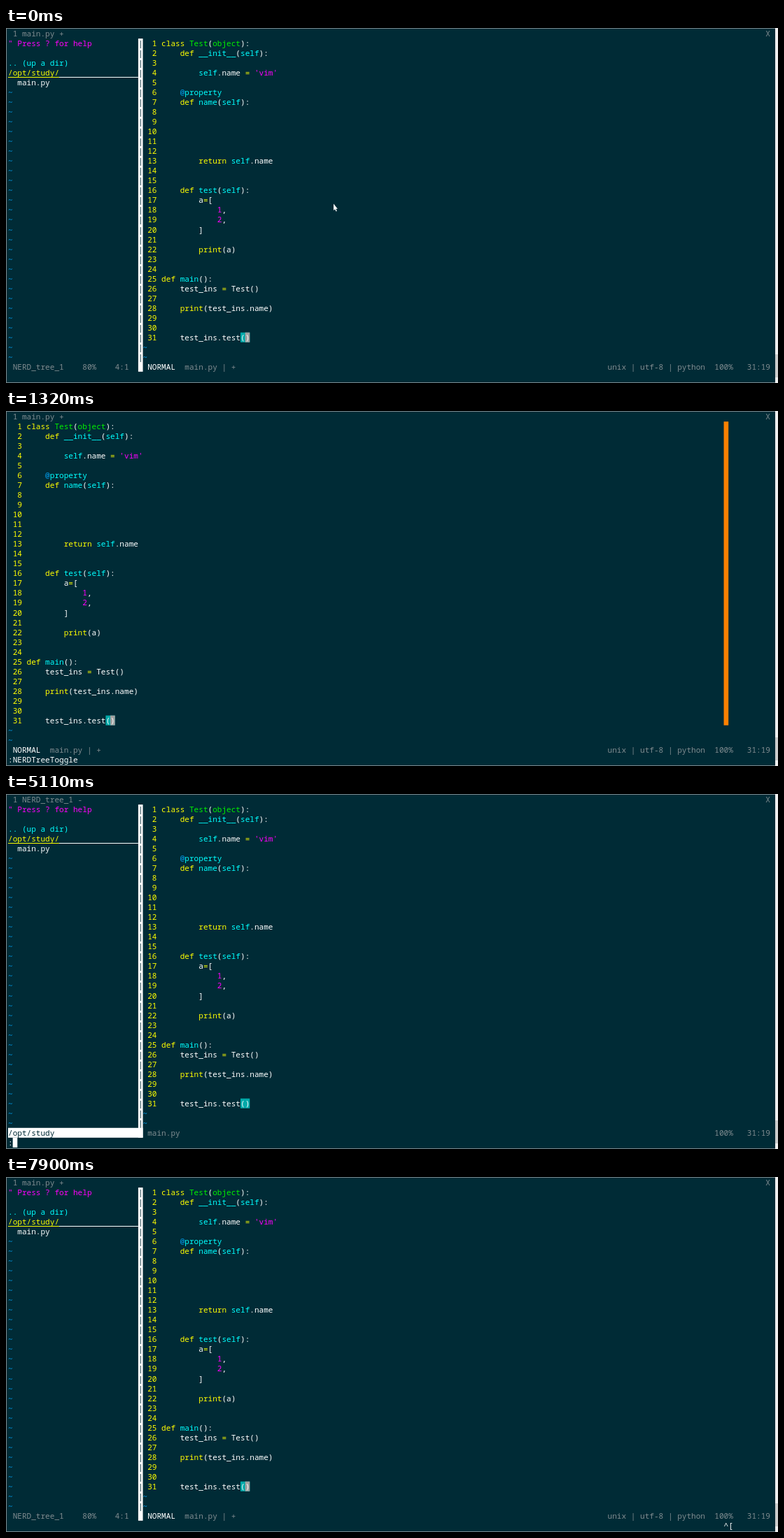
Write an HTML page with a canvas that moves like this. It is 1103 px wide and 508 px high and loops after 8 s.

```html
<!DOCTYPE html>
<html>
<head>
<meta charset="utf-8">
<style>
  html, body { margin: 0; width: 100%; height: 100%; overflow: hidden; background: #002b36; }
  canvas { display: block; }
</style>
</head>
<body>
<canvas id="screen" width="1103" height="508"></canvas>
<script>
const ctx = document.getElementById('screen').getContext('2d');
const CELL = 6.64, ROW = 14.02, LEFT = 3, TOP = 1.1, BASELINE = 11, LOOP = 8000;
const BG = '#002b36', WHITE = '#ffffff', GREY = '#808c90', YELLOW = '#ffff00',
      CYAN = '#00ffff', MAGENTA = '#ff00ff', GREEN = '#00f000', BLUE = '#00a0f0',
      TEAL = '#00a8a8', ORANGE = '#ff8000';
const TREE_COLS = 29;

const code = `class Test(object):
    def __init__(self):

        self.name = 'vim'

    @property
    def name(self):





        return self.name


    def test(self):
        a=[
            1,
            2,
        ]

        print(a)


def main():
    test_ins = Test()

    print(test_ins.name)


    test_ins.test()`.split('\n');

const syntax = [
  [/'[^']*'|\b\d+\b/g, MAGENTA],
  [/\b(class|def|return|print)\b|=/g, YELLOW],
  [/(?<=def )\w+|\bself\b|(?<=@)\w+/g, CYAN],
  [/(?<=class )\w+|\bobject\b/g, GREEN],
  [/@/g, BLUE],
];

// Each state holds from its start time until the next one.
const CMD = ':NERDTreeToggle';
const states = [
  { at: 0, tree: true, focus: 'code', cursor: true, pointer: true },
  { at: 270, focus: 'code', cursor: true, cmd: CMD },
  { at: 390, focus: 'code', cmd: CMD },
  { at: 790, tree: true, focus: 'tree', cursor: true, cmd: CMD },
  { at: 1320, focus: 'code', cursor: true, cmd: CMD },
  { at: 1470, focus: 'code', cmd: CMD },
  { at: 1750, tree: true, focus: 'tree', cursor: true, cmd: CMD },
  { at: 2510, tree: true, focus: 'tree', cmd: CMD },
  { at: 3030, tree: true, focus: 'tree', cursor: true, cmd: CMD },
  { at: 3590, tree: true, focus: 'tree', cmd: CMD },
  { at: 4140, tree: true, focus: 'tree', cursor: true, cmd: CMD },
  { at: 4390, tree: true, focus: 'tree', cmdCursor: true, cmd: ':' },
  { at: 4670, tree: true, focus: 'tree', cmd: ':' },
  { at: 5110, tree: true, focus: 'tree', cmdCursor: true, cmd: ':' },
  { at: 5690, tree: true, focus: 'tree', cmd: ':' },
  { at: 6120, tree: true, focus: 'tree', cursor: true },
  { at: 6370, tree: true, focus: 'tree', cursor: true, keys: '^[' },
  { at: 6800, tree: true, focus: 'tree', keys: '^[' },
  { at: 6950, tree: true, focus: 'tree', cursor: true, keys: '^W' },
  { at: 7100, tree: true, focus: 'code', cursor: true },
  { at: 7760, tree: true, focus: 'code', keys: '^[' },
  { at: 7900, tree: true, focus: 'code', cursor: true, keys: '^[' },
];

const xOf = col => LEFT + col * CELL;
const yOf = row => TOP + row * ROW;

function box(col, row, cols, rows, color) {
  ctx.fillStyle = color;
  ctx.fillRect(xOf(col), yOf(row), cols * CELL, rows * ROW);
}

function text(str, col, row, color) {
  ctx.fillStyle = color;
  [...str].forEach((ch, i) => {
    if (ch !== ' ') ctx.fillText(ch, xOf(col + i), yOf(row) + BASELINE);
  });
}

function highlighted(line, col, row) {
  const colors = Array(line.length).fill(WHITE);
  for (const [pattern, color] of syntax)
    for (const m of line.matchAll(pattern)) colors.fill(color, m.index, m.index + m[0].length);
  [...line].forEach((ch, i) => text(ch, col + i, row, colors[i]));
}

function drawFrame() {
  ctx.fillStyle = BG;
  ctx.fillRect(0, 0, 1103, 508);
  ctx.fillStyle = '#7d8a8e';
  ctx.fillRect(0, 0, 1099, 1);
  ctx.fillRect(0, 0, 1, 508);
  ctx.fillRect(0, 507, 1099, 1);
  ctx.fillStyle = '#f0f0f0';
  ctx.fillRect(1099, 0, 4, 508);
  ctx.fillStyle = '#cdcdcd';
  ctx.fillRect(1099, 467, 4, 33);
}

function drawTree({ focus, cursor }) {
  const focused = focus === 'tree';
  text('" Press ? for help', 0, 1, MAGENTA);
  text('.. (up a dir)', 0, 3, CYAN);
  text('/opt/study/', 0, 4, YELLOW);
  ctx.fillStyle = YELLOW;
  ctx.fillRect(LEFT, 70, 11 * CELL, 1);
  ctx.fillStyle = WHITE;
  ctx.fillRect(xOf(11), 70, 17 * CELL, 1);
  text('main.py', 2, 5, WHITE);
  for (let row = 6; row < 34; row++) text('~', 0, row, BLUE);

  box(28, 1, 1, 34, WHITE);
  for (let row = 1; row < 34; row++) text('|', 28, row, BG);
  if (focused) {
    box(0, 34, TREE_COLS, 1, WHITE);
    text('/opt/study', 0, 34, BG);
  } else {
    text('NERD_tree_1    80%    4:1', 1, 34, GREY);
  }
  if (focused && cursor) {
    box(0, 4, 1, 1, WHITE);
    text('/', 0, 4, BG);
  }
}

function drawCode({ tree, focus, cursor }) {
  const left = tree ? TREE_COLS : 0;
  code.forEach((line, i) => {
    text(String(i + 1).padStart(3), left, i + 1, YELLOW);
    highlighted(line, left + 4, i + 1);
  });
  text('~', left, 32, BLUE);
  text('~', left, 33, BLUE);

  const paren = left + 4 + code[30].length - 2;
  box(paren, 31, 2, 1, TEAL);
  if (focus === 'code' && cursor) box(paren + 1, 31, 1, 1, '#a0a0a0');
  text('()', paren, 31, WHITE);

  if (!tree) box(154, 1, 1, 31, ORANGE);
  if (focus === 'code') {
    text('NORMAL', left + 1, 34, WHITE);
    text('main.py | +', left + 9, 34, GREY);
    text('unix | utf-8 | python', 129, 34, GREY);
  } else {
    text('main.py', left + 1, 34, GREY);
  }
  text('100%   31:19', 152, 34, GREY);
}

function drawPointer() {
  ctx.fillStyle = WHITE;
  ctx.fill(new Path2D('M468 251.5v9.5l2-1.8 1.5 3.3 1.3-.6-1.4-3.1h2.4z'));
}

function draw(state) {
  drawFrame();
  text(state.focus === 'tree' ? '1 NERD_tree_1 -' : '1 main.py +', 1, 0, GREY);
  text('X', 163, 0, GREY);
  if (state.tree) drawTree(state);
  drawCode(state);
  text(state.cmd || '', 0, 35, WHITE);
  text(state.keys || '', 154, 35, WHITE);
  if (state.cmdCursor) box(1, 35, 1, 1, WHITE);
  if (state.pointer) drawPointer();
}

ctx.font = '500 11.06px "Noto Sans Mono", "DejaVu Sans Mono", monospace';
const start = performance.now();
function tick() {
  const t = (performance.now() - start) % LOOP;
  draw(states.findLast(s => s.at <= t));
  requestAnimationFrame(tick);
}
tick();
</script>
</body>
</html>
```
